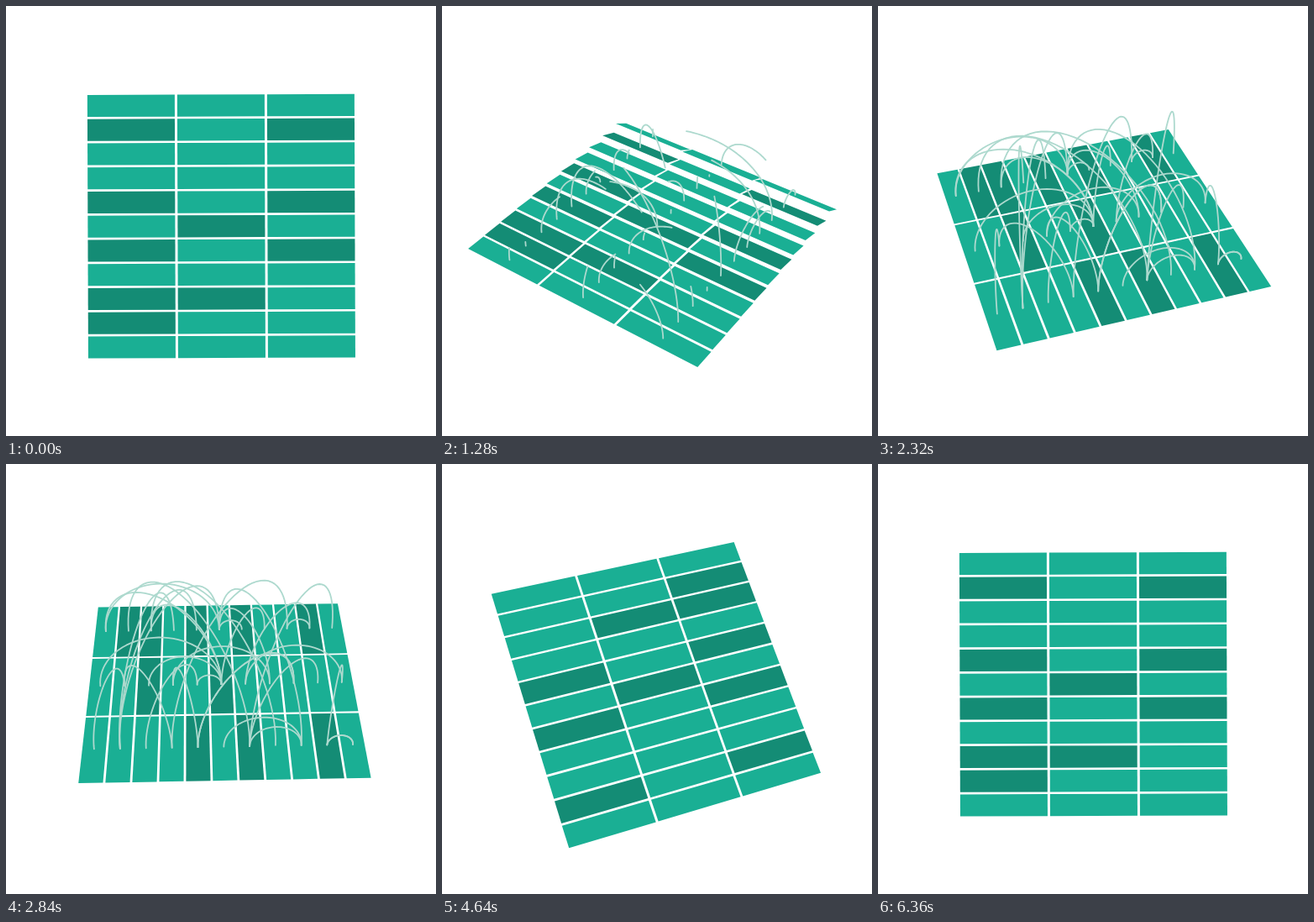
An HTML page with a canvas for the animation above (6.4 s loop, 512 by 512 pixels).

```html
<!DOCTYPE html>
<html lang="en">
<head>
<meta charset="utf-8">
<title>Turning grid</title>
<style>
  html, body { margin: 0; width: 100%; height: 100%; overflow: hidden; background: #fff; }
  canvas { display: block; width: 512px; height: 512px; }
</style>
</head>
<body>
<canvas id="stage" width="512" height="512"></canvas>
<script>
const ctx = document.getElementById('stage').getContext('2d');
const LOOP = 6400, COLS = 3, ROWS = 11, FOCAL = 1210;
const PITCH_X = 107, PITCH_Y = 28.75, HALF_W = 52, HALF_H = 13.1;
const LIGHT = [26, 175, 148], DARK = [20, 140, 117];
const DARK_ROWS = [[1, 4, 6, 8, 9], [5, 8], [1, 4, 6]];

// time and turn of the board on screen, in degrees
const TURN = [
  [0, -0.2], [720, 13.7], [1800, 56], [2840, 88.5],
  [3560, 118.6], [4640, 163.4], [5480, 179], [6400, 179.8]
];

const rad = deg => deg * Math.PI / 180;
const clamp = v => Math.max(0, Math.min(1, v));
const smooth = v => { v = clamp(v); return v * v * (3 - 2 * v); };
const ramp = (t, from, to) => smooth((t - from) / (to - from));
const expoOut = u => u <= 0 ? 0 : 1 - 2 ** (-10 * u);
const noise = n => { const v = Math.sin(n * 12.9898) * 43758.5453; return v - Math.floor(v); };
const colX = col => (col - 1) * PITCH_X;
const rowY = row => (row - 5) * PITCH_Y;
const isDark = (row, col) => DARK_ROWS[col].includes(row) ? 1 : 0;

// monotone cubic through the turn points
function slope(i) {
  return (TURN[i + 1][1] - TURN[i][1]) / (TURN[i + 1][0] - TURN[i][0]);
}
function tangent(i) {
  if (i === 0 || i === TURN.length - 1) return 0;
  const a = slope(i - 1), b = slope(i);
  return 2 * a * b / (a + b);
}
function turnAt(t) {
  let i = 0;
  while (i < TURN.length - 2 && t >= TURN[i + 1][0]) i++;
  const [t0, v0] = TURN[i], [t1, v1] = TURN[i + 1];
  const d = t1 - t0, u = (t - t0) / d, w = 1 - u;
  return v0 + (v1 - v0) * smooth(u) + d * u * w * (tangent(i) * w - tangent(i + 1) * u);
}

function camera(t) {
  const rise = ramp(t, 0, 1400), fall = ramp(t, 3360, 5800);
  const tilt = rad(49.5 * rise * (1 - fall));
  const roll = rad(47 * Math.sqrt(fall) - 22 * (1 - rise));
  const spin = rad(turnAt(t)) - roll;
  const cs = Math.cos(spin), ss = Math.sin(spin);
  const ct = Math.cos(tilt), st = Math.sin(tilt);
  const cr = Math.cos(roll), sr = Math.sin(roll);
  return (x, y, h) => {
    const px = x * cs - y * ss, q = x * ss + y * cs;
    const py = q * ct - h * st, z = FOCAL - q * st - h * ct, k = FOCAL / z;
    return [256.4 + (px * cr - py * sr) * k, 262.2 + (px * sr + py * cr) * k, z];
  };
}

// rows turn over from the last one up, the middle column leading
function flipAngle(t, row, col) {
  const wait = (10 - row) * 44.5 + Math.abs(col - 1) * 22;
  return Math.PI * (expoOut((t - 555 - wait) / 1000) - expoOut((t - 3512 - wait) / 1000));
}

function drawCells(t, project) {
  const fade = ramp(t, 5480, 6160), cells = [];
  for (let row = 0; row < ROWS; row++) {
    for (let col = 0; col < COLS; col++) {
      const a = flipAngle(t, row, col), x = colX(col), y = rowY(row);
      const dy = HALF_H * Math.cos(a), dh = HALF_H * Math.sin(a);
      const pts = [[-1, -1], [1, -1], [1, 1], [-1, 1]]
        .map(([u, v]) => project(x + u * HALF_W, y + v * dy, -v * dh));
      const dark = isDark(row, col) * (1 - fade) + isDark(10 - row, 2 - col) * fade;
      cells.push({ pts, dark, z: project(x, y, 0)[2] });
    }
  }
  cells.sort((a, b) => b.z - a.z);
  for (const { pts, dark } of cells) {
    ctx.fillStyle = `rgb(${LIGHT.map((v, i) => Math.round(v + (DARK[i] - v) * dark))})`;
    ctx.beginPath();
    pts.forEach(p => ctx.lineTo(p[0], p[1]));
    ctx.fill();
  }
}

// every cell throws one half circle to another cell up to five rows away
function drawLinks(t, project) {
  ctx.strokeStyle = '#add9ce';
  ctx.lineWidth = 1.8;
  ctx.lineCap = ctx.lineJoin = 'round';
  for (let n = 0; n < ROWS * COLS; n++) {
    const to = smooth((t - 900 - 350 * noise(n + 1)) / 550);
    const from = smooth((t - 2780 - 450 * noise(n + 40)) / 900);
    if (to <= from) continue;
    const row = n % ROWS, col = Math.floor(n / ROWS);
    const step = 1 + Math.floor(noise(n + 80) * 5);
    const endRow = row + (row + step < ROWS && (row < step || noise(n + 120) < 0.5) ? step : -step);
    const endCol = Math.floor(noise(n + 160) * COLS);
    const x0 = colX(col), y0 = rowY(row), x1 = colX(endCol), y1 = rowY(endRow);
    const radius = Math.hypot(x1 - x0, y1 - y0) / 2;
    ctx.beginPath();
    for (let s = 0; s <= 40; s++) {
      const a = Math.PI * (from + (to - from) * s / 40), m = (1 - Math.cos(a)) / 2;
      const p = project(x0 + (x1 - x0) * m, y0 + (y1 - y0) * m, radius * Math.sin(a));
      ctx.lineTo(p[0], p[1]);
    }
    ctx.stroke();
  }
}

const start = performance.now();
function frame() {
  const t = (performance.now() - start) % LOOP;
  const project = camera(t);
  ctx.fillStyle = '#fff';
  ctx.fillRect(0, 0, 512, 512);
  drawCells(t, project);
  drawLinks(t, project);
  requestAnimationFrame(frame);
}
frame();
</script>
</body>
</html>
```
